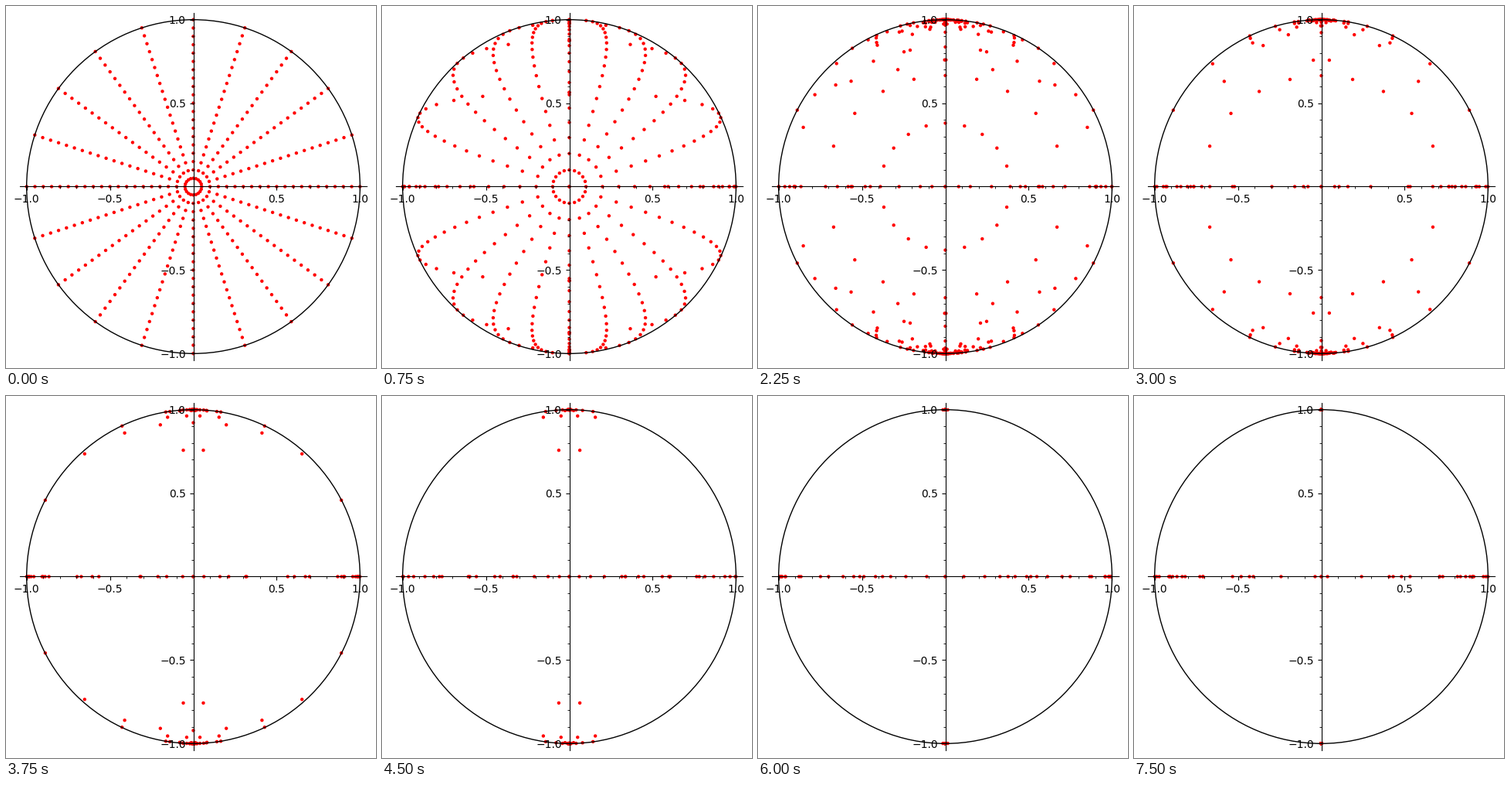
Recreate the animation shown at these times as a matplotlib script. Size 479 px wide and 468 px high, loop 8250 ms.

```python
import matplotlib.pyplot as plt
import numpy as np
from matplotlib.animation import FuncAnimation
from matplotlib.patches import Circle
from matplotlib.ticker import AutoMinorLocator

W, H, DPI = 479, 468, 100
CX, CY = 242.5, H - 233.5      # disk centre in pixels from the lower left
HALF, LIM = 224.44, 1.04       # half the axes side in pixels, data limit
STEPS, INTERVAL = 11, 750


def polar_grid(n=20):
    r = np.arange(1, n + 1) / n
    a = 2 * np.pi * np.arange(n) / n
    r, a = np.meshgrid(r, a)
    return (r * np.cos(a)).ravel(), (r * np.sin(a)).ravel()


def step(x, y):
    """Map the unit disk into itself; the poles (0, +-1) attract."""
    w = np.sqrt(np.clip(1 - x**2 - y**2, 0, None))
    d = 1 + y**2
    return 2 * x * w / d, 2 * y / d


def orbit(k):
    x, y = polar_grid()
    for _ in range(k):
        x, y = step(x, y)
    return np.column_stack([x, y])


plt.rcParams["font.family"] = "DejaVu Sans"
fig = plt.figure(figsize=((W + 1e-6) / DPI, (H + 1e-6) / DPI), dpi=DPI,
                 facecolor="white")
ax = fig.add_axes([(CX - HALF) / W, (CY - HALF) / H, 2 * HALF / W, 2 * HALF / H])
ax.set_xlim(-LIM, LIM)
ax.set_ylim(-LIM, LIM)

for side in ("right", "top"):
    ax.spines[side].set_visible(False)
for side in ("left", "bottom"):
    ax.spines[side].set_position("zero")
for axis in (ax.xaxis, ax.yaxis):
    axis.set_ticks([-1, -0.5, 0.5, 1])
    axis.set_minor_locator(AutoMinorLocator(5))

ax.add_patch(Circle((0, 0), 1, fill=False, ec="black", lw=1, zorder=5))
start = orbit(0)
dots = ax.scatter(start[:, 0], start[:, 1], s=10, c="red", edgecolors="none",
                  zorder=1)


def update(k):
    dots.set_offsets(orbit(k))
    return (dots,)


anim = FuncAnimation(fig, update, frames=STEPS, interval=INTERVAL,
                     repeat=True, repeat_delay=0)
plt.show()
```
